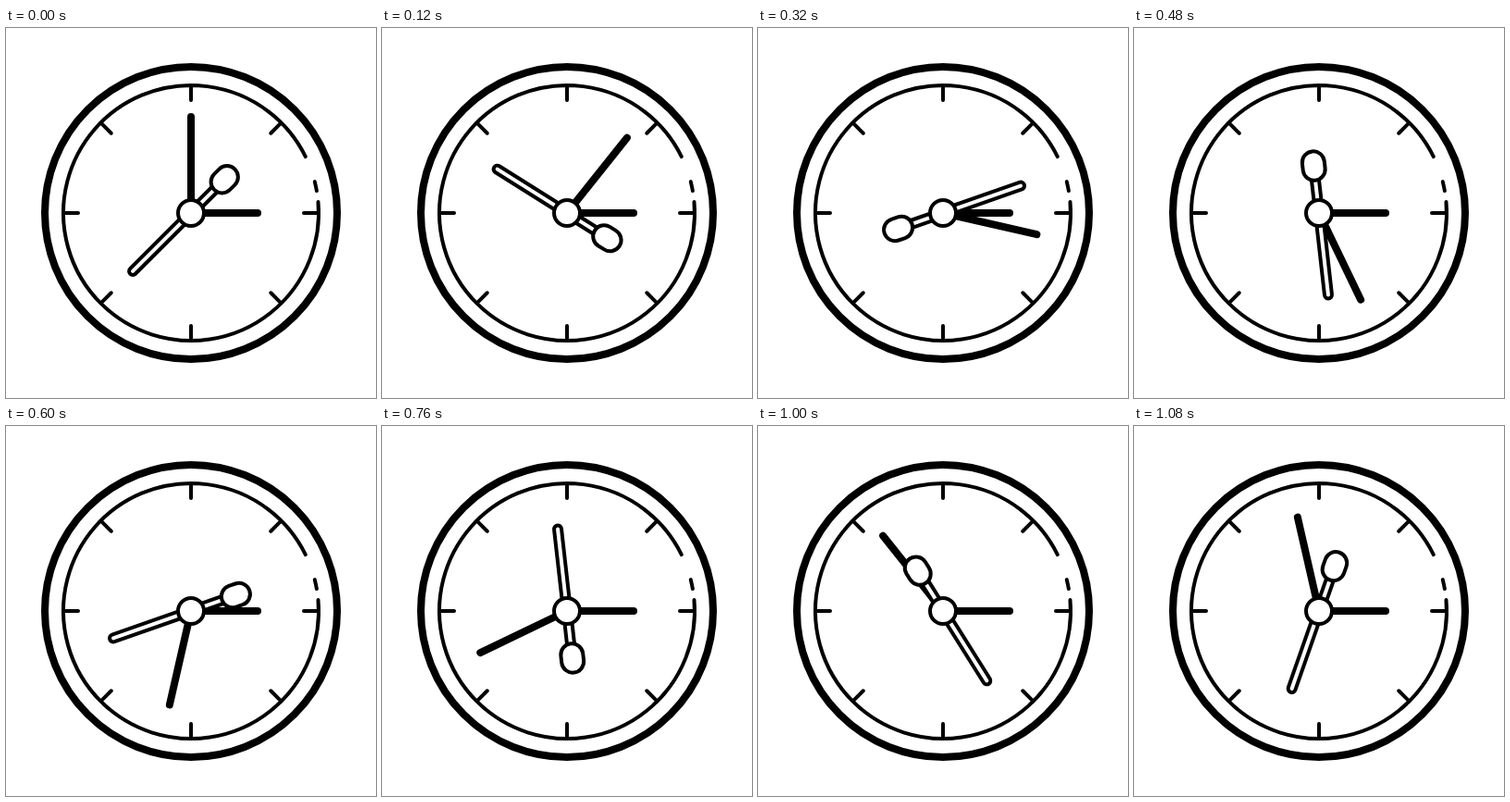
An HTML page for the animation above (1.12 s loop, 400 by 400 pixels).

```html
<!DOCTYPE html>
<html lang="en">
<head>
<meta charset="utf-8">
<title>Clock</title>
<style>
  html, body { margin: 0; height: 100%; overflow: hidden; background: #fff; }
  svg { display: block; width: 100vw; height: 100vh; }
</style>
</head>
<body>
<svg viewBox="-200 -200 400 400" fill="none" stroke="#000" stroke-width="4" stroke-linecap="round">
  <circle r="158" stroke-width="8"/>
  <g id="dial"></g>
  <path d="M0 0H72" stroke-width="8"/>
  <path id="minute" d="M0 0V-104" stroke-width="8"/>
  <g id="second" fill="#fff">
    <rect x="-4" y="-93" width="8" height="141" rx="4"/>
    <rect x="-12" y="35.5" width="24" height="31.5" rx="12"/>
  </g>
  <circle r="14" fill="#fff"/>
</svg>
<script>
const LOOP = 1120, STEP = 40;
const byId = id => document.getElementById(id);

// Point on the dial; degrees run clockwise from three o'clock.
const at = (deg, r) => {
  const a = deg * Math.PI / 180;
  return (r * Math.cos(a)).toFixed(2) + ' ' + (r * Math.sin(a)).toFixed(2);
};
const arc = (from, to) =>
  `M${at(from, 138)}A138 138 0 ${to - from > 180 ? 1 : 0} 1 ${at(to, 138)}`;

// Inner ring with a broken stretch, then the eight ticks.
let d = arc(-5, 333.8) + arc(-14.2, -10);
for (let a = 0; a < 360; a += 45) d += `M${at(a, 138)}L${at(a, 122)}`;
byId('dial').innerHTML = `<path d="${d}"/>`;

function draw() {
  const t = performance.now() % LOOP;
  const turn = Math.floor(t / STEP) * STEP / LOOP * 360;
  byId('minute').setAttribute('transform', `rotate(${turn})`);
  byId('second').setAttribute('transform', `rotate(${225 + 2 * turn})`);
  requestAnimationFrame(draw);
}
draw();
</script>
</body>
</html>
```
